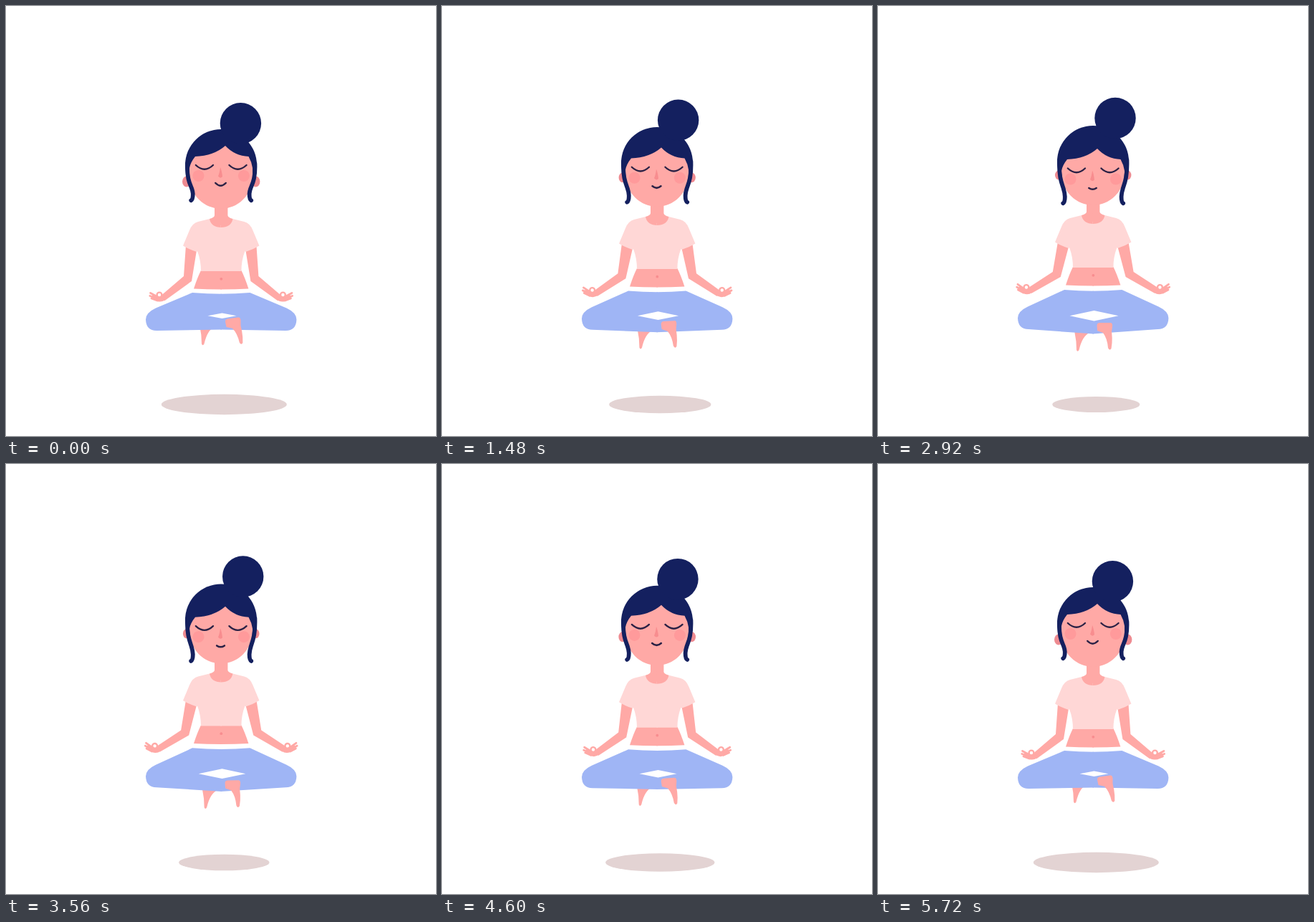
Animation of 600x600 px, one loop 5.76 s. Source, as an HTML page:

```html
<!DOCTYPE html>
<html lang="en">
<head>
<meta charset="utf-8">
<title>Floating meditation</title>
<style>
  html, body { margin: 0; width: 100%; height: 100%; overflow: hidden; background: #fff; }
  svg { display: block; width: 100%; height: 100%; }
</style>
</head>
<body>
<svg id="stage" viewBox="0 0 600 600"></svg>
<script>
const LOOP = 5760, STEP = 40;
const SKIN = '#ffa9a6', BLUSH = '#ff9a9b', SHADE = '#f88d8f', EAR = '#ee8b91';
const HAIR = '#14205f', LINE = '#2a2145', SHIRT = '#ffd7d6', PANTS = '#9fb5f5', SHADOW = '#e3d3d3';

const fill = (color, d) => `<path fill="${color}" d="${d}"/>`;
const line = (color, width, d) =>
  `<path fill="none" stroke="${color}" stroke-width="${width}" stroke-linecap="round" d="${d}"/>`;
const oval = (color, x, y, rx, ry = rx) =>
  `<ellipse fill="${color}" cx="${x}" cy="${y}" rx="${rx}" ry="${ry}"/>`;
const group = (transform, ...parts) => `<g transform="${transform}">${parts.join('')}</g>`;
const move = (x, y, ...parts) => group(`translate(${x} ${y})`, ...parts);
const both = (...parts) => parts.join('') + group('matrix(-1 0 0 1 600.4 0)', ...parts);

// p: 0 is the lowest pose, 1 the highest
function arm(p) {
  const elbow = (x, y) => `${x - 4.2 * p} ${y - p}`;
  const wrist = (x, y) => `${x - 7 * p} ${y - 5.5 * p}`;
  return fill(SKIN, `M251 334 L${elbow(248, 377)} L${wrist(217, 403.5)} L${wrist(221, 411.5)} L${elbow(259, 384)} L266 341Z`)
    + move(-7 * p, -5.5 * p, group(`rotate(${8 * p} 214 403)`,
      fill(SKIN, 'M204 403 L210 405 L218 403 L223 409 Q218 414 211 412 L203 408Z'),
      line(SKIN, 2.8, 'M201.5 400.5 L210 405 M200.8 404.5 L209 407.5 M203 408 L211 411'),
      `<circle cx="214" cy="403" r="3.4" fill="#fff" stroke="${SKIN}" stroke-width="2.4"/>`));
}

function torso(p) {
  const shirtHalf = `M301 306 L284 297 L268 301 Q260 303 256 313 L247 334.5 Q256 340 266 343
    L267 342 Q272 355 272 370 H301Z`;
  return move(0, -5 * p,
    both(arm(p), fill(SKIN, 'M301 369 H272 Q267 379 262 394.5 Q280 395.5 301 395.5Z')),
    oval(SHADE, 300.3, 380.8, 1.9),
    both(fill(SHIRT, shirtHalf), fill(SKIN, 'M301 272 H291 V292 Q291 295 284 297 Q286 309 301 309Z')));
}

function legs(p) {
  const hip = 400 - 4 * p, crotch = 451.5 + 6 * p, knee = y => y - 2 * p;
  const w = 20 + 14 * p, h = 3.8 + 3.4 * p;
  return move(-4 * (1 - p), -8.5 * (1 - p),
      fill(SKIN, 'M275 450 H298 L296 455.5 Q285 460 280.5 480 Q278.5 483.5 277 480 Q277 467 274.5 456Z'))
    + both(fill(PANTS, `M301 ${hip + 1.7} Q280 ${hip + 1.7} 260 ${hip} L209 ${knee(421.5)}
      Q195 ${knee(428)} 195 ${knee(437.5)} Q195.5 ${knee(453)} 210 ${knee(453)} L301 ${crotch}Z`))
    + fill('#fff', `M${301.5 - w} 432.2 l${w} ${-h} l${w} ${h} l${-w} ${h}Z`)
    + group(`translate(0 ${-5 * (1 - p)}) rotate(${-8 * (1 - p)} 306 442)`,
      fill(SKIN, `M305.5 446 Q305.5 442 309.5 442 H324 Q327.5 442 327 447 L326 454 Q327 463 326.5 470
        L325.5 478 Q323 481.5 321 477 Q320 464 314 456 L306 453Z`));
}

function head(p) {
  const chin = 238 - 5 * p, drop = 4 * p, smile = 7.2 - 2 * p;
  const mask = `M256 ${226 + drop} q1.5 -8 8 -16 q26 -1 42 -15 q13 14 32.5 15 q4.5 8 5.5 16
    V${chin} A44 45 0 0 1 256 ${chin}Z`;
  const lock = `M253 ${220 - 5 * p} C252 249 260.5 251 260.8 ${262 + drop} q0 8 -2.6 9.3`;
  return move(0, -9 * p, both(oval(EAR, 252, 245, 6 - p, 7.5 - p)))
    + oval(HAIR, 300, 222 - 5 * p, 50)
    + oval(HAIR, 327.4 + 3.6 * p, 163.8 - 7.4 * p, 28.7)
    + fill(SKIN, mask)
    + both(line(HAIR, 5.8, lock))
    + move(0, 4.5 * p,
      both(oval(BLUSH, 268.5, 237, 8), line(LINE, 2.3, 'M264.8 222 Q277 233.5 289 222')),
      fill(SHADE, 'M299 225 Q301 229 302 238 Q299 241.5 296 237.5 Q298 233 299 225Z'))
    + line(LINE, 2.5, `M${299.5 - smile} ${247 + 7 * p} q${smile} ${7.5 - 4 * p} ${2 * smile} 0`);
}

const shadow = p => oval(SHADOW, 304.3, 556, 87.5 - 26.5 * p, 14.2 - 3.2 * p);

// Cubic ease with handles at (.35, 0) and (.5, 1)
function ease(x) {
  let lo = 0, hi = 1;
  for (let i = 0; i < 20; i++) {
    const s = (lo + hi) / 2, r = 1 - s;
    if (3 * r * r * s * .35 + 3 * r * s * s * .5 + s ** 3 < x) lo = s; else hi = s;
  }
  return lo * lo * (3 - 2 * lo);
}

const stage = document.getElementById('stage');
const start = performance.now();

function draw() {
  const t = Math.floor((performance.now() - start) % LOOP / STEP) * STEP;
  const p = ease(1 - Math.abs(t / (LOOP / 2) - 1));
  stage.innerHTML = shadow(p) + torso(p) + legs(p) + head(p);
  requestAnimationFrame(draw);
}
draw();
</script>
</body>
</html>
```
